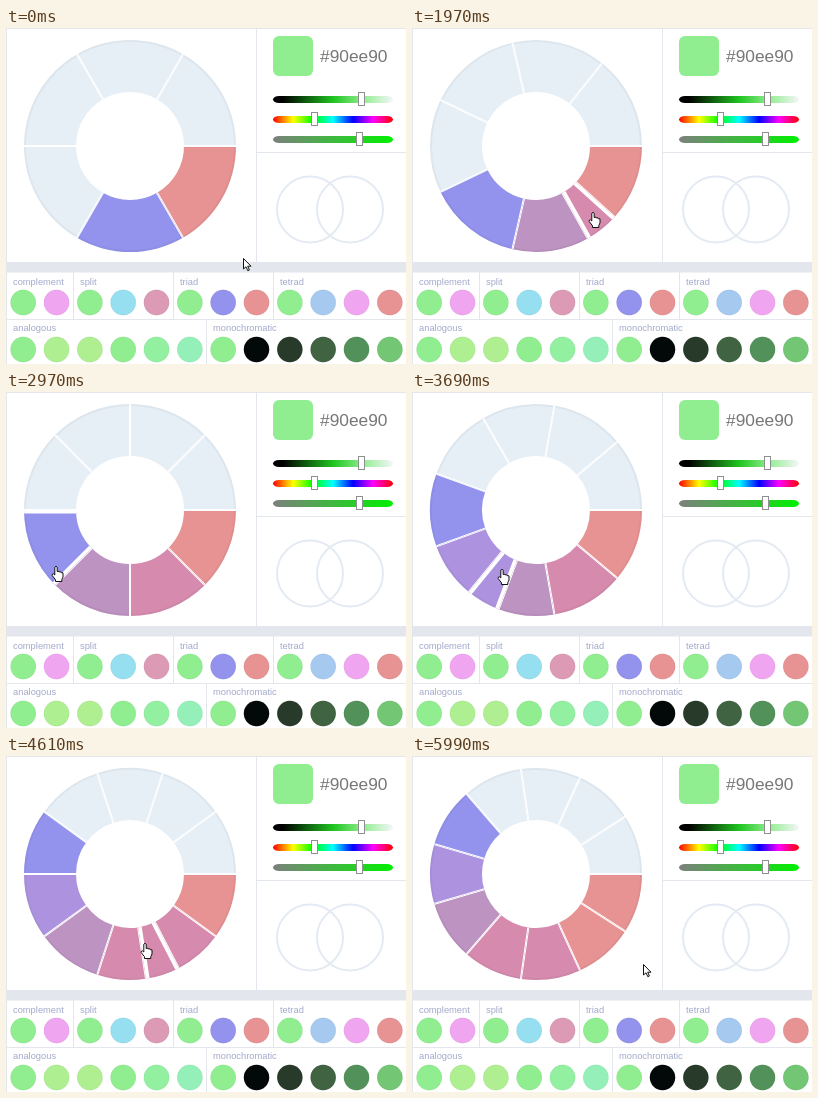
Write an HTML page with a canvas that moves like this. It is 400 px wide and 336 px high and loops after 6620 ms.

```html
<!DOCTYPE html>
<html lang="en">
<head>
<meta charset="utf-8">
<title>Color wheel mixer</title>
<style>
  html, body { margin: 0; width: 100%; height: 100%; overflow: hidden; background: #fff; }
  svg, canvas { position: absolute; left: 0; top: 0; width: 400px; height: 336px; }
  text { font-family: Arial, "Liberation Sans", sans-serif; }
  .label { font-size: 9.33px; fill: #a3a9cb; }
  .rule { stroke: #e4e6ee; fill: none; }
  .thumb { fill: #fff; stroke: #8f8f8f; }
  .ring { fill: none; stroke: #e4eaf3; stroke-width: 2; }
</style>
</head>
<body>
<svg viewBox="0 0 400 336">
  <defs>
    <linearGradient id="light">
      <stop offset="0" stop-color="#000"/><stop offset=".08" stop-color="#000"/>
      <stop offset=".5" stop-color="#1fc41f"/><stop offset=".75" stop-color="#90ee90"/>
      <stop offset="1" stop-color="#f4f6f8"/>
    </linearGradient>
    <linearGradient id="hue">
      <stop offset="0" stop-color="#f00"/><stop offset=".167" stop-color="#ff0"/>
      <stop offset=".333" stop-color="#0f0"/><stop offset=".5" stop-color="#0ff"/>
      <stop offset=".667" stop-color="#00f"/><stop offset=".833" stop-color="#f0f"/>
      <stop offset="1" stop-color="#f00"/>
    </linearGradient>
    <linearGradient id="sat">
      <stop offset="0" stop-color="#7c807c"/><stop offset="1" stop-color="#00f000"/>
    </linearGradient>
  </defs>
  <rect y="234" width="400" height="10.5" fill="#e4e6ee"/>
  <path class="rule" d="M0 .5H400M.5 0V336M250.5 0V234M250 124.5H400M0 291.5H400M67.5 244V291M167.5 244V291M267.5 244V291M200.5 291V336"/>
  <rect x="267" y="8" width="40" height="40" rx="6" fill="#90ee90"/>
  <text x="314" y="34" font-size="17.33" fill="#777">#90ee90</text>
  <rect x="267" y="68" width="120" height="7" rx="6" ry="3.5" fill="url(#light)"/>
  <rect x="267" y="88" width="120" height="7" rx="6" ry="3.5" fill="url(#hue)"/>
  <rect x="267" y="108" width="120" height="7" rx="6" ry="3.5" fill="url(#sat)"/>
  <rect class="thumb" x="352.5" y="64.5" width="6" height="13"/>
  <rect class="thumb" x="305.5" y="84.5" width="6" height="13"/>
  <rect class="thumb" x="350.5" y="104.5" width="6" height="13"/>
  <circle class="ring" cx="304" cy="181.5" r="33"/>
  <circle class="ring" cx="344" cy="181.5" r="33"/>
  <g class="label">
    <text x="7" y="257">complement</text><text x="74" y="257">split</text>
    <text x="174" y="257">triad</text><text x="274" y="257">tetrad</text>
    <text x="7" y="303">analogous</text><text x="207" y="303">monochromatic</text>
  </g>
  <g id="swatches"></g>
</svg>
<canvas id="stage"></canvas>
<script>
const LOOP = 6620, TAU = Math.PI * 2, DEG = Math.PI / 180;
const CX = 124, CY = 118, OUTER = 106, INNER = 54;
const HALF_WEDGE = 9.3 * DEG, HOVER_REACH = 7 * DEG;
const BASE = '#90ee90', PALE = '#e6eef6', EMPTY_SLOTS = 4;
const HUES = ['#e79393', '#d68bae', '#bd93c1', '#ad93df', '#9393ee'];

const swatchRows = [
  [274.5, [BASE, '#f0a5f0', BASE, '#96dff0', '#dc9ab5', BASE, HUES[4], HUES[0], BASE, '#a6c9f0', '#f0a5f0', HUES[0]]],
  [321.5, [BASE, '#aeef92', '#b0ee92', BASE, '#92f0a0', '#94f0b8', BASE, '#030808', '#283a2a', '#406342', '#52925a', '#72c674']]
];
document.getElementById('swatches').innerHTML = swatchRows.map(([y, colors]) =>
  colors.map((color, i) =>
    `<circle cx="${17.2 + i * 33.33}" cy="${y}" r="12.7" fill="${color}" stroke="#000" stroke-opacity=".04"/>`
  ).join('')).join('');

// Pointer hot spot: time, x, y
const track = [
  [0, 237, 230], [250, 237, 230], [590, 169, 189], [1289, 169, 189], [1320, 174, 186],
  [1640, 174, 186], [1740, 178, 185], [1969, 178, 185], [1970, 181, 184], [2530, 181, 184],
  [2760, 130, 197], [2970, 49.5, 174], [3190, 74, 178], [3630, 74, 178], [3690, 90, 177],
  [3990, 114, 188], [4080, 139, 187], [4640, 139, 187], [4970, 190, 164], [5510, 190, 164],
  [5990, 231, 208], [LOOP, 231, 208]
];
// Clicks: time, slot where the mixed color is inserted
const clicks = [[1290, 1], [2270, 1], [3350, 3], [4610, 2], [5270, 1]];

// Midpoint of two hues; ties lean to the nearer end of the range
function mix(a, b) {
  const mid = (a + b) / 2;
  return mid < 2 ? Math.floor(mid) : Math.ceil(mid);
}

function huesAt(time) {
  const hues = [0, 4];
  for (const [at, slot] of clicks)
    if (time >= at) hues.splice(slot, 0, mix(hues[slot - 1], hues[slot]));
  return hues;
}

function pointerAt(time) {
  const next = Math.max(1, track.findIndex(key => key[0] > time));
  const [t0, x0, y0] = track[next - 1], [t1, x1, y1] = track[next];
  const k = (time - t0) / (t1 - t0);
  return [x0 + (x1 - x0) * k, y0 + (y1 - y0) * k];
}

const canvas = document.getElementById('stage');
const ctx = canvas.getContext('2d');
const ratio = window.devicePixelRatio || 1;
canvas.width = 400 * ratio;
canvas.height = 336 * ratio;

function drawSector(from, to, color, inset) {
  ctx.save();
  ctx.beginPath();
  ctx.arc(CX, CY, OUTER, from, to);
  ctx.arc(CX, CY, INNER, to, from, true);
  ctx.closePath();
  ctx.fillStyle = color;
  ctx.fill();
  ctx.clip();
  ctx.beginPath();
  ctx.arc(CX, CY, OUTER, from, to);
  ctx.strokeStyle = 'rgba(0,0,40,.04)';
  ctx.lineWidth = 4;
  ctx.stroke();
  ctx.beginPath();
  for (const angle of [from, to]) {
    ctx.moveTo(CX, CY);
    ctx.lineTo(CX + 120 * Math.cos(angle), CY + 120 * Math.sin(angle));
  }
  ctx.strokeStyle = '#fff';
  ctx.lineWidth = inset * 2;
  ctx.stroke();
  ctx.restore();
}

const arrow = new Path2D('M.5 .5V11L3 8.8 4.8 12.7 6.4 12 4.7 8.2H8Z');
const hand = new Path2D('M-1.2 9V1.2Q0 -.6 1.2 1.2V5.5L3 5.2 3.4 6 5 5.8 5.5 6.8 7 6.8V11L5.8 13.5V15.5H-.5V13.8L-3.8 9.5Q-4 7.6 -2.6 7.8Z');

function drawPointer(x, y, shape) {
  ctx.save();
  ctx.translate(Math.round(x), Math.round(y));
  ctx.fillStyle = '#fff';
  ctx.strokeStyle = '#111';
  ctx.lineWidth = 1;
  ctx.lineJoin = 'round';
  ctx.fill(shape);
  ctx.stroke(shape);
  ctx.restore();
}

function draw(time) {
  const hues = huesAt(time), [x, y] = pointerAt(time);
  const count = hues.length + EMPTY_SLOTS, step = TAU / count;
  const radius = Math.hypot(x - CX, y - CY);
  const angle = (Math.atan2(y - CY, x - CX) + TAU) % TAU;
  const inside = radius > INNER && radius < OUTER;
  const edge = Math.round(angle / step);
  const wedge = inside && edge > 0 && edge < hues.length &&
    Math.abs(angle - edge * step) < HOVER_REACH ? edge : -1;
  const hovered = inside && wedge < 0 ? Math.floor(angle / step) : -1;

  ctx.setTransform(ratio, 0, 0, ratio, 0, 0);
  ctx.clearRect(0, 0, 400, 336);
  for (let i = 0; i < count; i++) {
    const from = i * step + (i === wedge ? HALF_WEDGE : 0);
    const to = (i + 1) * step - (i + 1 === wedge ? HALF_WEDGE : 0);
    drawSector(from, to, i < hues.length ? HUES[hues[i]] : PALE, i === hovered ? 3.6 : 1);
  }
  if (wedge > 0) {
    const center = wedge * step;
    drawSector(center - HALF_WEDGE, center + HALF_WEDGE, HUES[mix(hues[wedge - 1], hues[wedge])], 3.6);
  }
  drawPointer(x, y, inside ? hand : arrow);
}

const start = performance.now();
function tick() {
  draw((performance.now() - start) % LOOP);
  requestAnimationFrame(tick);
}
tick();
</script>
</body>
</html>
```
